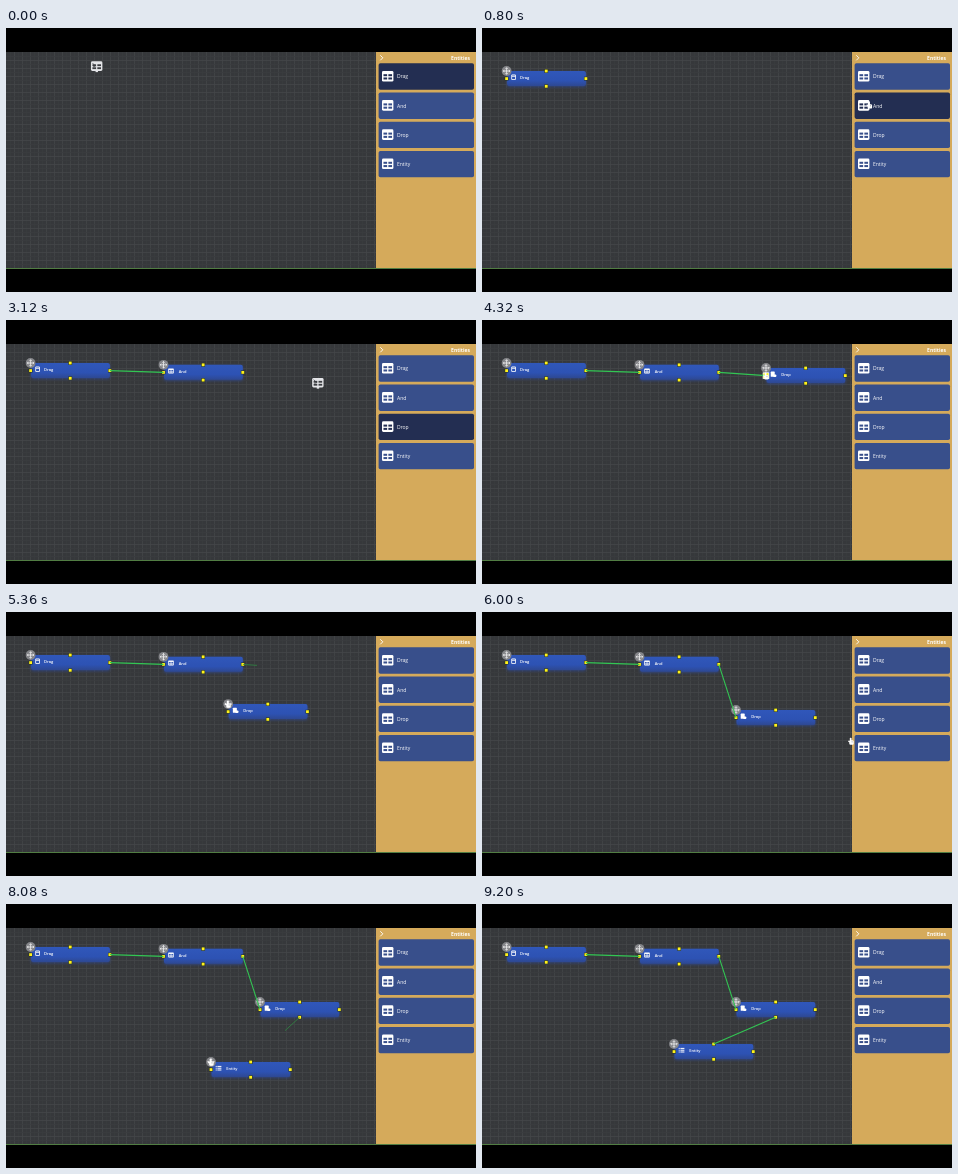
Write an HTML page with a canvas that moves like this. It is 470 by 264 pixels and loops after 9280 ms.

```html
<!DOCTYPE html>
<html lang="en">
<head>
<meta charset="utf-8">
<title>Entity diagram</title>
<style>
html, body { margin: 0; width: 100%; height: 100%; overflow: hidden; background: #000; }
canvas { display: block; width: 470px; height: 264px; }
</style>
</head>
<body>
<canvas id="stage"></canvas>
<script>
const W = 470, H = 264, LOOP = 9280, STEP = 80;
const TOP = 24, BOTTOM = 240, SIDE = 370;
const CARD_W = 79.3, CARD_H = 15;
const GREEN = '#32c653', YELLOW = '#fff21c', BLUE = '#384f8b', NAVY = '#232e52';
const names = ['Drag', 'And', 'Drop', 'Entity'];

const canvas = document.getElementById('stage');
const ctx = canvas.getContext('2d');
const dpr = window.devicePixelRatio || 1;
canvas.width = W * dpr;
canvas.height = H * dpr;

// What the user does; each kind of gesture has one duration.
const duration = { fetch: 560, place: 480, reach: 400, link: 560, grab: 400, move: 480, leave: 560 };
const script = [
  { kind: 'place', id: 0, at: [24.6, 43] },
  { kind: 'fetch', id: 1 },
  { kind: 'place', id: 1, at: [157.5, 44.8] },
  { kind: 'reach', id: 0, port: 'right' },
  { kind: 'link', id: 1, port: 'left' },
  { kind: 'fetch', id: 2 },
  { kind: 'place', id: 2, at: [284, 48] },
  { kind: 'reach', id: 1, port: 'right' },
  { kind: 'link', id: 2, port: 'left' },
  { kind: 'grab', id: 2 },
  { kind: 'move', id: 2, at: [211, 90] },
  { kind: 'move', id: 2, at: [254, 98] },
  { kind: 'fetch', id: 3 },
  { kind: 'place', id: 3, at: [205, 158] },
  { kind: 'reach', id: 2, port: 'bottom' },
  { kind: 'link', id: 3, port: 'top' },
  { kind: 'grab', id: 3 },
  { kind: 'move', id: 3, at: [192, 140] },
  { kind: 'leave', at: [120, 60] }
];

const mix = (a, b, u) => a.map((v, i) => v + (b[i] - v) * u);
const easeOut = u => 1 - (1 - u) ** 2;
const smooth = u => u * u * (3 - 2 * u);
const paletteY = i => 35.3 + i * 29.2;

function ports([x, y]) {
  return {
    left: [x, y + 7.6], right: [x + CARD_W, y + 7.6],
    top: [x + CARD_W / 2, y], bottom: [x + CARD_W / 2, y + CARD_H + 0.3]
  };
}

function goal({ kind, id, port, at }, cards) {
  if (kind === 'fetch') return [395, paletteY(id) + 13];
  if (port) return ports(cards[id])[port];
  return at || cards[id];
}

// Replays the script up to time t.
function sceneAt(t) {
  const scene = { cards: [], links: [], pointer: [173, 32] };
  const { cards, links } = scene;
  let begin = -160, source;
  for (const step of script) {
    const { kind, id } = step;
    const end = goal(step, cards);
    const u = Math.min(1, (t - begin) / duration[kind]);
    const pos = mix(scene.pointer, end, (kind === 'move' ? smooth : easeOut)(u));
    const done = u === 1;
    if (kind === 'place' && done) cards[id] = end;
    if (kind === 'reach') source = step;
    if (kind === 'link') links.push({ from: source, to: step, tip: done ? null : pos });
    if (kind === 'move') {
      if (!done) scene.moving = { id, home: script.find(s => s.id === id && s.at).at };
      cards[id] = pos;
    }
    scene.pointer = pos;
    if (!done) {
      if (kind === 'place') scene.held = id;
      return scene;
    }
    begin += duration[kind];
  }
  scene.pointer = null;
  return scene;
}

function rect(x, y, w, h, fill) {
  ctx.fillStyle = fill;
  ctx.fillRect(x, y, w, h);
}

function square([x, y], size, fill) {
  rect(x - size / 2, y - size / 2, size, size, fill);
}

function rounded(x, y, w, h, r, fill) {
  ctx.fillStyle = fill;
  ctx.beginPath();
  ctx.roundRect(x, y, w, h, r);
  ctx.fill();
}

function line(points, color, width) {
  ctx.strokeStyle = color;
  ctx.lineWidth = width;
  ctx.beginPath();
  points.forEach(p => ctx.lineTo(...p));
  ctx.stroke();
}

function text(s, x, y, size, weight = 400, align = 'left') {
  ctx.font = `${weight} ${size}px "Open Sans", sans-serif`;
  ctx.textAlign = align;
  ctx.fillStyle = '#fff';
  ctx.fillText(s, x, y);
}

function tableIcon(x, y, w, h, ink, paper) {
  rounded(x, y, w, h, w * 0.12, paper);
  for (let i = 0; i < 4; i++)
    rect(x + w * (0.13 + (i % 2) * 0.43), y + h * (0.31 + (i >> 1) * 0.31), w * 0.32, h * 0.19, ink);
}

function board() {
  rect(0, 0, W, H, '#000');
  rect(0, TOP, SIDE, BOTTOM - TOP, '#36383b');
  const tone = v => v % 8 ? '#3a3c3f' : '#444649';
  for (let x = 4; x < SIDE; x += 4) rect(x, TOP, 0.8, BOTTOM - TOP, tone(x));
  for (let y = TOP + 4; y < BOTTOM; y += 4) rect(0, y, SIDE, 0.8, tone(y));
}

function sidebar({ pointer, held }) {
  rect(SIDE, TOP, W - SIDE, BOTTOM - TOP, '#d5aa5b');
  line([[374.3, 27.3], [376.8, 29.8], [374.3, 32.3]], '#fff', 0.9);
  text('Entities', 464, 31.8, 5, 700, 'right');
  names.forEach((name, i) => {
    const y = paletteY(i);
    const over = pointer && pointer[0] > 373 && pointer[1] > y && pointer[1] < y + 26.4;
    const color = held === i || over ? NAVY : BLUE;
    rounded(372.6, y, 95.4, 26.4, 1.8, color);
    tableIcon(376, y + 7.6, 11.4, 10.6, color, '#fff');
    text(name, 391, y + 15, 5);
  });
  rect(0, BOTTOM, W, 1, '#517d43');
}

const cardIcons = [
  (x, y) => {
    rounded(x, y, 4.6, 5.4, 1, '#fff');
    rect(x + 0.8, y + 0.9, 3, 0.8, '#2e54b4');
    rect(x + 0.8, y + 2.4, 3, 2.2, '#2e54b4');
  },
  (x, y) => tableIcon(x, y, 5.6, 5, '#2e54b4', '#fff'),
  (x, y) => {
    rounded(x, y, 4, 5.2, 0.6, '#fff');
    rounded(x + 2.6, y + 2.8, 3, 2.6, 0.8, '#fff');
  },
  (x, y) => {
    for (let r = 0; r < 3; r++) {
      rect(x, y + 0.3 + r * 1.8, 1, 1, '#fff');
      rect(x + 1.7, y + 0.3 + r * 1.8, 4, 1, '#fff');
    }
  }
];

function card([x, y], id) {
  ctx.save();
  ctx.shadowColor = 'rgba(45,72,150,.75)';
  ctx.shadowBlur = 3 * dpr;
  ctx.shadowOffsetY = dpr;
  const g = ctx.createLinearGradient(0, y, 0, y + CARD_H);
  g.addColorStop(0, '#3057ba');
  g.addColorStop(0.65, '#2d52b3');
  g.addColorStop(1, '#2e4891');
  rounded(x + 0.5, y, CARD_W - 0.5, CARD_H, 2, g);
  ctx.restore();
  cardIcons[id](x + 4.7, y + 3.6);
  text(names[id], x + (id ? 15.2 : 13.5), y + 8.2, 4, 600);
}

function moveHandle([x, y]) {
  ctx.save();
  ctx.translate(x, y);
  ctx.fillStyle = '#85868a';
  ctx.beginPath();
  ctx.arc(0, 0, 4.9, 0, Math.PI * 2);
  ctx.fill();
  for (let i = 0; i < 4; i++) {
    line([[0, 0], [0, -3.2]], '#fff', 0.7);
    line([[-1.1, -2.2], [0, -3.3], [1.1, -2.2]], '#fff', 0.7);
    ctx.rotate(Math.PI / 2);
  }
  ctx.restore();
}

function cardTrim(pos, pointer) {
  moveHandle(pos);
  for (const p of Object.values(ports(pos))) {
    const near = pointer && Math.hypot(p[0] - pointer[0], p[1] - pointer[1]) < 2;
    square(p, near ? 6.5 : 3.8, near ? '#fff' : '#28331e');
    square(p, near ? 5 : 2.8, YELLOW);
  }
}

// The link of a card on the move shrinks to a stub aimed at where the card stood.
function drawLink({ from, to, tip }, { cards, moving }) {
  const a = ports(cards[from.id])[from.port];
  const b = ports(cards[to.id])[to.port];
  if (moving && moving.id === to.id)
    line([a, mix(a, ports(moving.home)[to.port], 0.3)], '#2f8a43', 0.8);
  else line([a, tip || b], GREEN, 1.1);
}

function hand([x, y]) {
  ctx.save();
  ctx.translate(x, y);
  rounded(-1.3, -3.2, 1.8, 5, 0.8, '#fff');
  rounded(-1.8, -0.6, 4.4, 4.4, 1.2, '#fff');
  line([[-1.2, 1], [-2.8, 0]], '#fff', 1.2);
  line([[1, 0.2], [1, 1.6]], '#55575b', 0.4);
  ctx.restore();
}

function ghost([x, y]) {
  tableIcon(x - 5.6, y - 4.8, 11.4, 9.6, '#3c3e42', '#e4e5e8');
  rect(x - 1, y + 4, 2.4, 2, '#e4e5e8');
  line([[x - 4, y - 3], [x - 1, y], [x - 3.4, y + 0.6]], '#3c3e42', 0.8);
}

function draw(t) {
  const scene = sceneAt(t);
  const { cards, links, pointer, held } = scene;
  ctx.setTransform(dpr, 0, 0, dpr, 0, 0);
  board();
  cards.forEach(card);
  cards.forEach(pos => cardTrim(pos, pointer));
  links.forEach(l => drawLink(l, scene));
  sidebar(scene);
  if (pointer) (held === undefined ? hand : ghost)(pointer);
}

const start = performance.now();
function tick() {
  const t = Math.max(0, performance.now() - start) % LOOP;
  draw(Math.floor(t / STEP) * STEP);
  requestAnimationFrame(tick);
}
tick();
</script>
</body>
</html>
```
